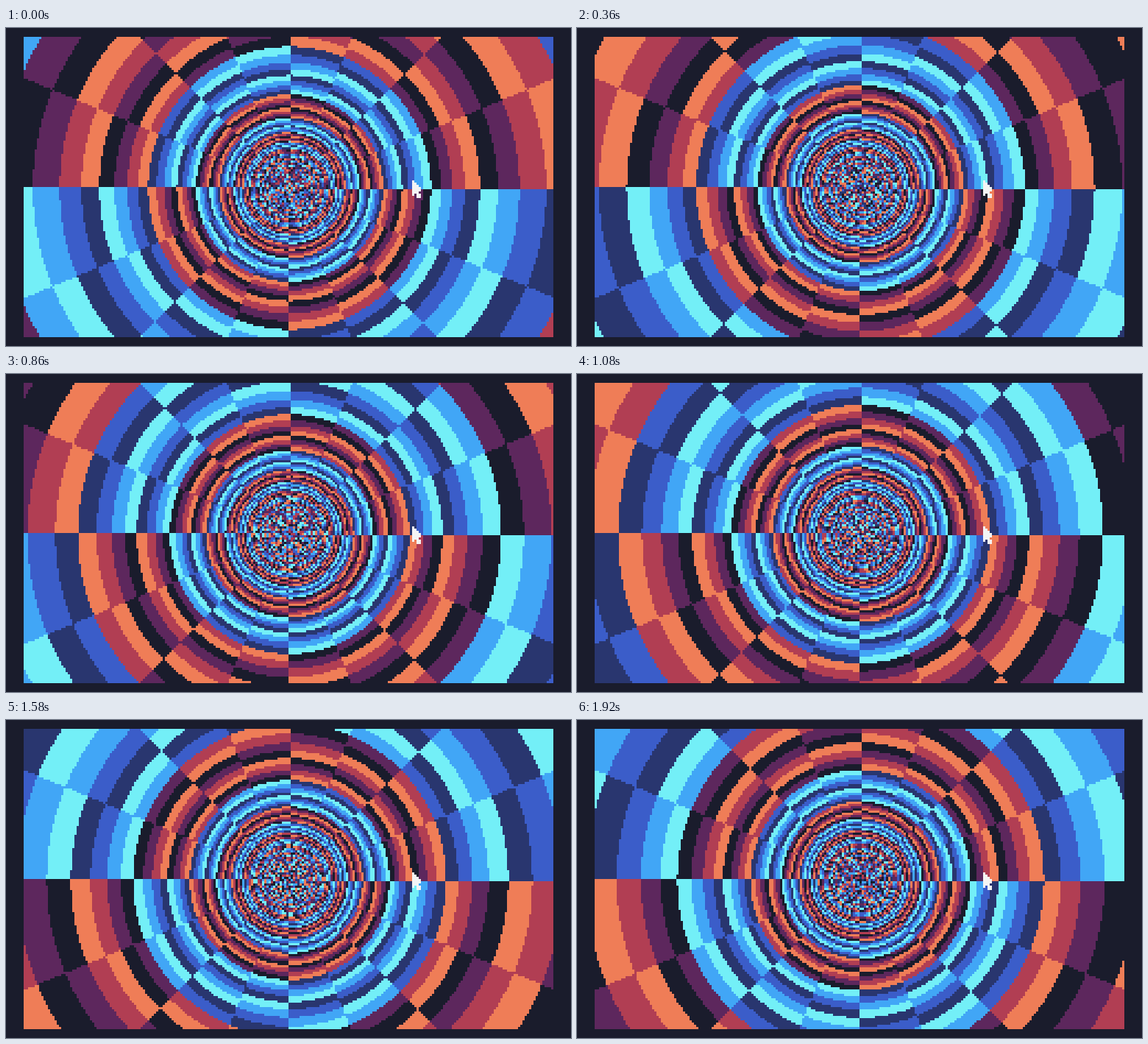
An HTML page with a canvas for the animation above (1.94 s loop, 768 by 432 pixels).

```html
<!DOCTYPE html>
<html lang="en">
<head>
<meta charset="utf-8">
<title>Pixel tunnel</title>
<style>
  html, body { margin: 0; width: 100%; height: 100%; overflow: hidden; background: #1a1c2c; }
  canvas {
    position: absolute; left: 24px; top: 12px;
    width: 720px; height: 408px;
    image-rendering: pixelated;
  }
</style>
</head>
<body>
<canvas id="screen" width="240" height="136"></canvas>
<script>
const W = 240, H = 136, LOOP = 1940, STEP = 20;
const DEPTH = 1000, START = 0.4, SPEED = 0.1204;

const ctx = document.getElementById('screen').getContext('2d');
const image = ctx.createImageData(W, H);
const pixels = new Uint32Array(image.data.buffer);

// Canvas pixels are stored as ABGR words.
const abgr = hex => {
  const n = parseInt(hex, 16);
  return (0xff000000 | (n & 255) << 16 | (n & 0xff00) | n >> 16) >>> 0;
};
const reds = ['1a1c2c', '5d275d', 'b13e53', 'ef7d57'].map(abgr);
const blues = ['29366f', '3b5dc9', '41a6f6', '73eff7'].map(abgr);
const palette = [...reds, ...reds, ...blues, ...blues];

// Sector number and depth of every pixel.
const sector = new Int8Array(W * H);
const depth = new Float64Array(W * H);
for (let y = 0; y < H; y++) {
  for (let x = 0; x < W; x++) {
    const dx = x - W / 2, dy = y - H / 2, i = y * W + x;
    sector[i] = Math.floor(-Math.atan2(dy, dx) * 8 / Math.PI);
    depth[i] = DEPTH / Math.hypot(dx, dy);
  }
}

const cursor = [
  'X',
  'XX',
  'XXX',
  'XXXX',
  'XXXX',
  'XXX',
  'X.XX',
  '..XX'
];

function drawCursor(left, top) {
  ctx.fillStyle = '#f4f4f4';
  cursor.forEach((row, y) => [...row].forEach((c, x) => {
    if (c === 'X') ctx.fillRect(left + x, top + y, 1, 1);
  }));
}

let shown = -1;
function draw() {
  const step = Math.floor(performance.now() % LOOP / STEP);
  if (step !== shown) {
    shown = step;
    const shift = START + step * SPEED;
    for (let i = 0; i < pixels.length; i++) {
      const ring = Math.floor(-depth[i] - shift);
      pixels[i] = palette[(ring ^ sector[i]) & 15];
    }
    ctx.putImageData(image, 0, 0);
    drawCursor(176, 65);
  }
  requestAnimationFrame(draw);
}
draw();
</script>
</body>
</html>
```
